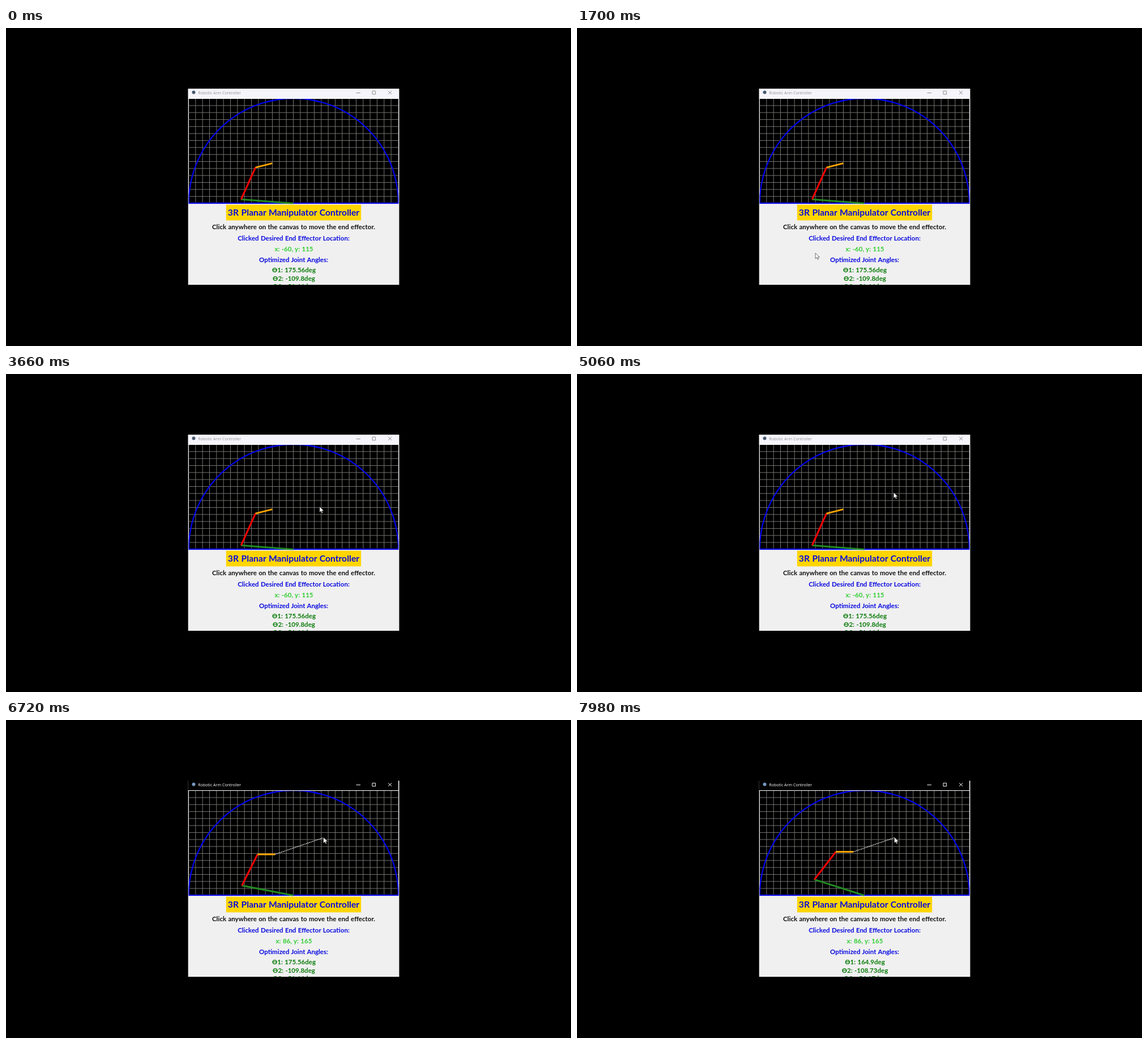
Write an HTML page that moves like this. It is 998 px wide and 561 px high and loops after 8000 ms.

```html
<!DOCTYPE html>
<html lang="en">
<head>
<meta charset="utf-8">
<title>Robotic Arm Controller</title>
<style>
  html, body { margin: 0; width: 100%; height: 100%; overflow: hidden; background: #000; }
  svg { display: block; width: 998px; height: 561px; }
  .label { font: bold 11.53px Lato, Carlito, sans-serif; word-spacing: .045em; text-anchor: middle; }
  .heading { font-size: 15.7px; }
  .caption { font: 7.1px "Open Sans", sans-serif; }
  .blue { fill: #0a0ae0; }
  .lime { fill: #32cd32; }
  .green { fill: #0c7c0c; }
  .arm line { stroke-width: 3; }
</style>
</head>
<body>
<svg viewBox="0 0 998 561">
  <defs>
    <clipPath id="frame"><rect x="321.7" y="107" width="372.8" height="346"/></clipPath>
    <clipPath id="board"><rect x="322.5" y="125" width="371" height="185.5"/></clipPath>
  </defs>
  <rect width="998" height="561"/>
  <g clip-path="url(#frame)">
    <rect x="321" y="107" width="374" height="346" fill="#f0f0f0"/>
    <rect id="bar" x="321" y="107" width="372" height="17"/>
    <circle id="icon" cx="331.5" cy="113.5" r="3"/>
    <text id="caption" class="caption" x="339.3" y="116.8">Robotic Arm Controller</text>
    <path id="buttons" fill="none" d="M618.5 114.5h7.5M647 111.3h5.6v5.6h-5.6zM675.2 111l6 6m0-6l-6 6"/>
    <path d="M321 124.5H693.5V107" fill="none" stroke="#fff"/>
    <rect x="323" y="125" width="370" height="185"/>
    <g clip-path="url(#board)">
      <path id="grid" fill="none" stroke="#747470"/>
      <path d="M322.7 309.2a185.2 185.2 0 0 1 370.4 0z" fill="none" stroke="#0000f0" stroke-width="2.2"/>
      <line id="route" stroke="#fff" stroke-width="1.5" stroke-dasharray="1.5 1.4"/>
      <g class="arm">
        <line stroke="#228b22"/>
        <line stroke="#f00"/>
        <line stroke="#ffa500"/>
      </g>
    </g>
    <rect x="388.8" y="311.7" width="238.4" height="27.7" fill="#ffd500"/>
    <text class="label heading blue" x="508" y="331.4">3R Planar Manipulator Controller</text>
    <text class="label" x="508" y="355" fill="#111">Click anywhere on the canvas to move the end effector.</text>
    <text class="label blue" x="508" y="375.2">Clicked Desired End Effector Location:</text>
    <text id="goal" class="label lime" x="508.5" y="394"></text>
    <text class="label blue" x="508" y="412.5">Optimized Joint Angles:</text>
    <text class="label green angle" x="508.5" y="431"></text>
    <text class="label green angle" x="508.5" y="445.8"></text>
    <text class="label green angle" x="508.5" y="460.4"></text>
    <path id="cursor" d="M0 0V10L2.4 7.9 4 11.4 5.6 10.7 4.1 7.3H7.3Z" fill="#fff" stroke="#333" stroke-width=".7"/>
  </g>
</svg>
<script>
const LOOP = 8000, CLICK = 6120, DEPART = 6256;
const SPEED = 0.000112; // share of the route per ms
const SCALE = 0.6167, CELL = 20 * SCALE;
const BASE = { x: 507.5, y: 309.5 };
const LINKS = [150, 100, 50];
const START = { x: -60, y: 115 }, GOAL = { x: 86, y: 165 };
const REST = [175.56, -109.8, -51.66];
const WAYPOINTS = 14;
// time, x, y of the pointer tip
const POINTER = [
  [1050, 316, 425], [1700, 421, 397], [2640, 482.5, 330],
  [3660, 554, 234], [4300, 559.3, 209], [5900, 559.3, 209], [6100, 560.7, 207]
];

const $ = id => document.getElementById(id);
const arm = document.querySelectorAll('.arm line');
const angles = document.querySelectorAll('.angle');
const set = (el, attrs) => { for (const k in attrs) el.setAttribute(k, attrs[k]); };
const toScreen = p => ({ x: BASE.x + p.x * SCALE, y: BASE.y - p.y * SCALE });
const setLine = (el, a, b) => set(el, { x1: a.x, y1: a.y, x2: b.x, y2: b.y });
const mix = (a, b, k) => a + (b - a) * k;
const degrees = r => r * 180 / Math.PI;

let grid = '';
for (let i = 1; i < 30; i++) grid += `M${322.5 + i * CELL} 124V309`;
for (let i = 1; i < 15; i++) grid += `M322 ${BASE.y - i * CELL}H693`;
set($('grid'), { d: grid });

// Joint angles at share k of the route, with the last link kept level.
function solve(k) {
  if (k <= 0) return REST;
  const [a, b, c] = LINKS;
  const x = mix(START.x, GOAL.x, k) - c, y = mix(START.y, GOAL.y, k);
  const t2 = -Math.acos((x * x + y * y - a * a - b * b) / (2 * a * b));
  const t1 = Math.atan2(y, x) - Math.atan2(b * Math.sin(t2), a + b * Math.cos(t2));
  return [degrees(t1), degrees(t2), -degrees(t1 + t2)];
}

function drawArm(pose) {
  let heading = 0, p = { x: 0, y: 0 };
  pose.forEach((angle, i) => {
    heading += angle * Math.PI / 180;
    const q = { x: p.x + LINKS[i] * Math.cos(heading), y: p.y + LINKS[i] * Math.sin(heading) };
    setLine(arm[i], toScreen(p), toScreen(q));
    p = q;
  });
  return p;
}

function pointerAt(t) {
  const i = POINTER.findIndex(p => p[0] > t);
  if (i === 0) return null;
  if (i < 0) return POINTER[POINTER.length - 1].slice(1);
  const a = POINTER[i - 1], b = POINTER[i], k = (t - a[0]) / (b[0] - a[0]);
  return [mix(a[1], b[1], k), mix(a[2], b[2], k)];
}

function render(t) {
  const active = t >= CLICK;
  set($('bar'), { fill: active ? '#000' : '#f5f5fb' });
  set($('icon'), { fill: active ? '#7899c4' : '#46586e' });
  set($('caption'), { fill: active ? '#fff' : '#929292' });
  set($('buttons'), { stroke: active ? '#fff' : '#8e8e8e' });

  const progress = Math.max(0, (t - DEPART) * SPEED);
  const tip = drawArm(solve(progress));
  setLine($('route'), toScreen(tip), toScreen(GOAL));
  set($('route'), { visibility: active ? 'visible' : 'hidden' });

  const goal = active ? GOAL : START;
  $('goal').textContent = `x: ${goal.x}, y: ${goal.y}`;
  // The readout changes only as the arm passes a waypoint.
  const passed = Math.floor(progress * WAYPOINTS) / WAYPOINTS;
  solve(passed).forEach((v, i) => {
    angles[i].textContent = `Ө${i + 1}: ${+v.toFixed(2)}deg`;
  });

  const p = pointerAt(t);
  set($('cursor'), {
    visibility: p ? 'visible' : 'hidden',
    transform: p ? `translate(${p})` : ''
  });
}

const begin = performance.now();
function tick() {
  render((performance.now() - begin) % LOOP);
  requestAnimationFrame(tick);
}
tick();
</script>
</body>
</html>
```
